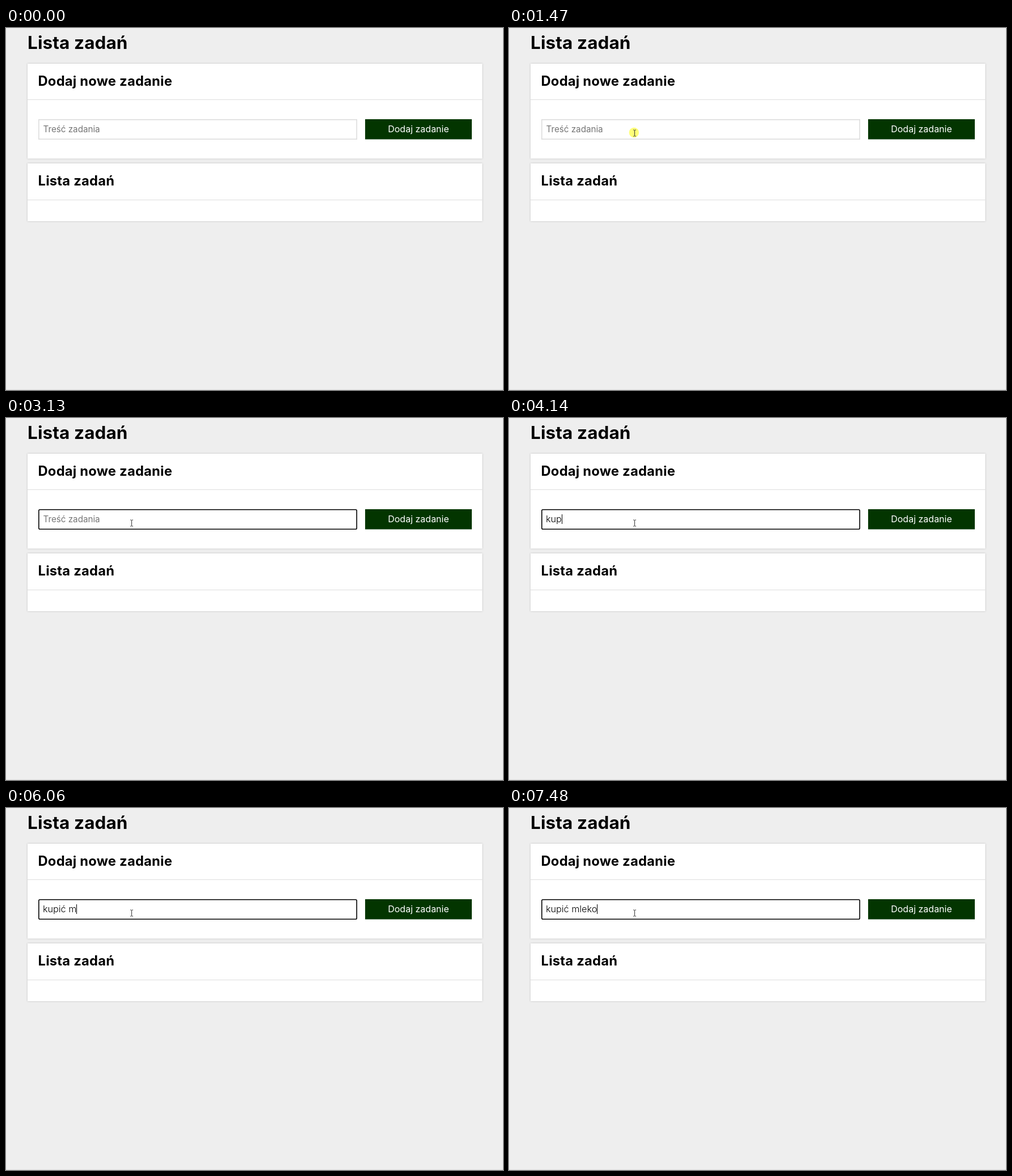
These frames come from a looping animation (876x639 px, 8000 ms). An HTML page:

```html
<!DOCTYPE html>
<html lang="pl">
<head>
<meta charset="utf-8">
<title>Lista zadań</title>
<style>
  html, body { margin: 0; width: 100%; height: 100%; overflow: hidden; background: #eee; }
  svg { display: block; width: 876px; height: 639px; }
  text { font: 400 16px Inter, "Open Sans", sans-serif; white-space: pre; }
  .title { font-size: 31.4px; font-weight: 700; letter-spacing: .15px; }
  .head { font-size: 23.7px; font-weight: 700; letter-spacing: .25px; }
  .panel { fill: #fff; filter: drop-shadow(0 0 1.5px #bbb); }
  .rule { fill: #ddd; }
  #hint { font-size: 15.2px; fill: #757575; }
  #typed { font-size: 16.2px; font-weight: 300; }
</style>
</head>
<body>
<svg viewBox="0 0 876 639">
  <rect width="876" height="639" fill="#eee"/>
  <rect class="rule" y="638" width="876" height="1"/>
  <text class="title" x="38" y="36.5">Lista zadań</text>

  <rect class="panel" x="38" y="63" width="801.5" height="167.5"/>
  <rect class="rule" x="38" y="126" width="801.5" height="1"/>
  <text class="head" x="56.5" y="101.5">Dodaj nowe zadanie</text>
  <rect id="field" x="57.8" y="161.8" width="560.4" height="34.4" fill="#fff" stroke-width="1.6"/>
  <text id="hint" x="65.5" y="183.5">Treść zadania</text>
  <text id="typed" x="65" y="183.5"></text>
  <rect id="caret" y="170" width="1" height="17"/>
  <rect x="633" y="161" width="188" height="35.5" fill="#033500"/>
  <text x="727" y="183.5" fill="#fff" text-anchor="middle">Dodaj zadanie</text>

  <rect class="panel" x="38" y="239" width="801.5" height="102"/>
  <rect class="rule" x="38" y="303" width="801.5" height="1"/>
  <text class="head" x="56.5" y="278">Lista zadań</text>

  <circle id="glow" cx="220.3" cy="184.5" r="8.7" fill="#ffff78"/>
  <path id="arrow" d="M0 0V12L3 9.5L5 14L7 13L5 9H8.5Z" fill="#fff" stroke="#222"/>
  <path id="beam" d="M-2.5-5.5H-1L0-5L1-5.5H2.5M0-5V5M-2.5 5.5H-1L0 5L1 5.5H2.5" fill="none" stroke="#333"/>
</svg>
<script>
const [field, hint, typed, caret, glow, arrow, beam] =
  ['field', 'hint', 'typed', 'caret', 'glow', 'arrow', 'beam'].map(id => document.getElementById(id));
const LOOP = 8000, ENTER = 520, PRESS = 1470, FOCUS = 1540, RELEASE = 1670, BLINK = 530;
const WORDS = 'kupić mleko';
const KEYS = [3470, 3670, 4140, 4410, 5140, 5730, 6060, 6530, 7010, 7210, 7480];

const show = (el, on) => el.setAttribute('visibility', on ? 'visible' : 'hidden');

function drawPointer(t) {
  // The pointer slows down in eight moves after it enters.
  const left = 1 - Math.max(0, Math.min(8, Math.floor((t - ENTER) / 68.7))) / 8;
  const x = 221.5 + 430.5 * left ** 2.41;
  const y = 185.5 + 398.5 * left ** 2.13;
  const inField = y < 197;
  show(arrow, t >= ENTER && !inField);
  show(beam, t >= ENTER && inField);
  for (const el of [arrow, beam]) el.setAttribute('transform', `translate(${x} ${y})`);
  show(glow, t >= PRESS && t < RELEASE);
}

function drawField(t) {
  const focused = t >= FOCUS;
  const count = KEYS.filter(k => k <= t).length;
  const since = t - (count ? KEYS[count - 1] : FOCUS);
  field.setAttribute('stroke', focused ? '#000' : '#ddd');
  field.setAttribute('rx', focused ? 2 : 0);
  typed.textContent = WORDS.slice(0, count);
  show(hint, !count);
  show(caret, focused && Math.floor(since / BLINK) % 2 === 0);
  caret.setAttribute('x', Math.round(65 + (count ? typed.getComputedTextLength() : 0)));
}

const start = performance.now();
function draw() {
  const t = (performance.now() - start) % LOOP;
  drawPointer(t);
  drawField(t);
  requestAnimationFrame(draw);
}
draw();
</script>
</body>
</html>
```
